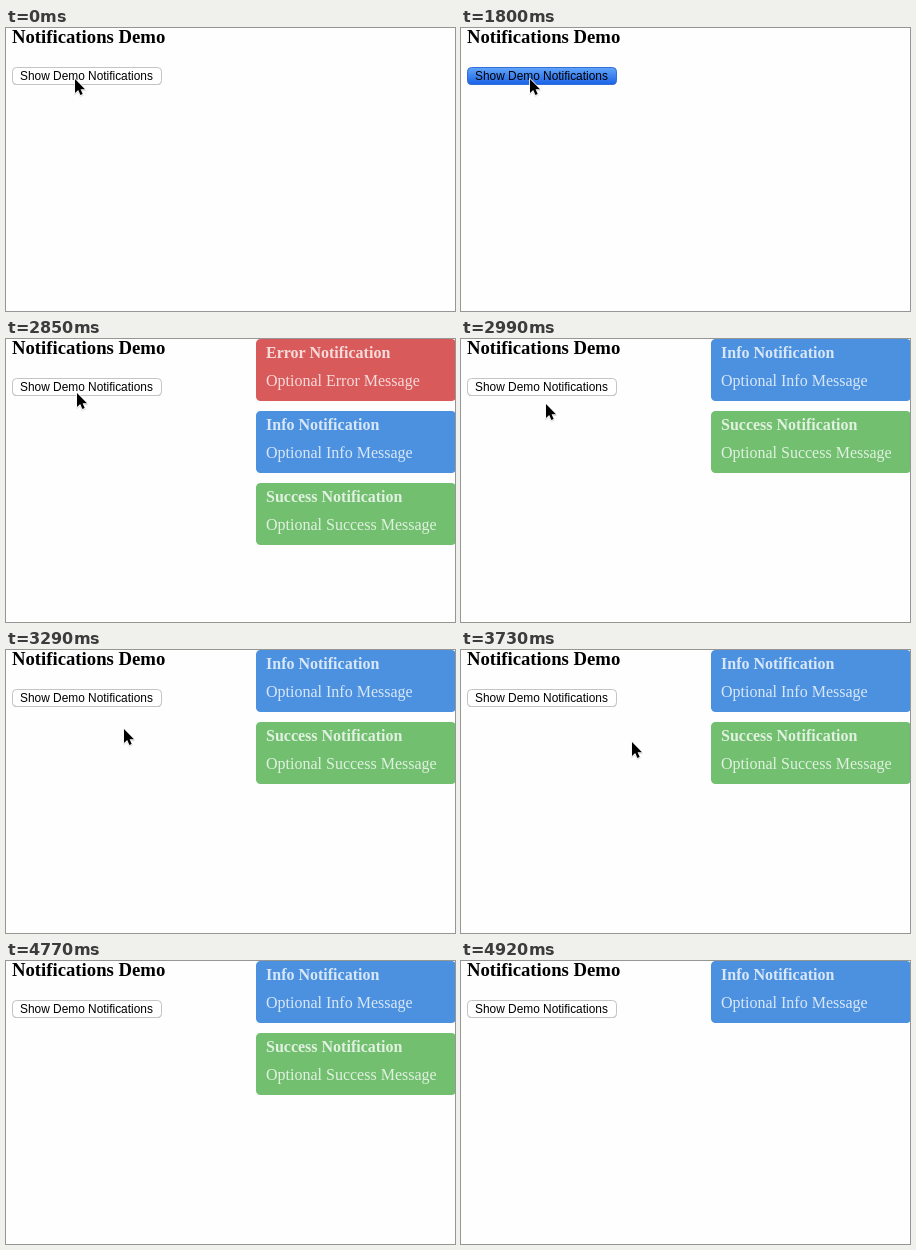
An HTML page that plays this animation: 449x283 px, repeating every 6.09 s.

```html
<!DOCTYPE html>
<html lang="en">
<head>
<meta charset="utf-8">
<title>Notifications Demo</title>
<style>
  html, body { margin: 0; width: 100%; height: 100%; overflow: hidden; background: #fefefe; }
  svg { display: block; width: 449px; height: 283px; }
  text { font: 16px "Liberation Serif", serif; font-variant-ligatures: none; }
  .bold { font-weight: bold; }
  .heading { font-size: 18.72px; }
  .label { font: 11.9px "Liberation Sans", sans-serif; }
  .note text { fill: #fff; fill-opacity: .78; }
</style>
</head>
<body>
<svg viewBox="0 0 449 283">
  <defs>
    <linearGradient id="pressed" x2="0" y2="1">
      <stop stop-color="#62a5fa"/>
      <stop offset="1" stop-color="#1a62e6"/>
    </linearGradient>
  </defs>
  <text class="bold heading" x="6" y="15">Notifications Demo</text>
  <rect x="6.5" y="40" width="149" height="17" rx="4" fill="#aaa"/>
  <rect id="button" x="6.5" y="39.5" width="149" height="17" rx="4"/>
  <text class="label" x="14" y="52">Show Demo Notifications</text>
  <g id="notes"></g>
  <g id="arrow" stroke-linejoin="round">
    <path d="M2 1V15L5.2 12L7.4 17L9.7 16L7.6 11.2H12Z" fill="#000" fill-opacity=".15"
      stroke="#000" stroke-opacity=".12" stroke-width="2" transform="translate(0 .8)"/>
    <path d="M2 1V15L5.2 12L7.4 17L9.7 16L7.6 11.2H12Z" stroke="#fff" stroke-width="1.6" paint-order="stroke"/>
  </g>
  <path id="beam" d="M1.5 1.5Q4.5 1.5 4.5 4Q4.5 1.5 7.5 1.5M4.5 4V14M1.5 16.5Q4.5 16.5 4.5 14Q4.5 16.5 7.5 16.5M3 11.5H6"
    fill="none" stroke="#222"/>
</svg>
<script>
const LOOP = 6090, PRESS = 1800, SHOW = 1950;
const $ = id => document.getElementById(id);

// Each notification has a colour and the time at which it closes.
const notes = [
  ["Error", "#d95a5a", 2990],
  ["Info", "#4c91df", LOOP],
  ["Success", "#72bf70", 4920],
].map(([kind, color, end]) => {
  $("notes").insertAdjacentHTML("beforeend", `<g class="note">
    <rect x="250" width="200" height="62" rx="4.5" fill="${color}"/>
    <text class="bold" x="260" y="19">${kind} Notification</text>
    <text x="260" y="47">Optional ${kind} Message</text></g>`);
  return { node: $("notes").lastElementChild, end };
});

// Pointer samples: time, left, top, shape.
const pointer = [
  [0, 67, 50, "arrow"], [2850, 69, 53, "arrow"], [2990, 83, 64, "arrow"],
  [3140, 107, 75, "arrow"], [3290, 116, 78, "arrow"], [3730, 169, 91, "arrow"],
  [3880, 257, 106, "beam"], [4030, 315, 141, "arrow"], [4180, 356, 189, "arrow"],
  [4330, 378, 213, "arrow"], [4480, 391, 228, "arrow"], [4620, 404, 260, "arrow"],
  [4770, 0, 0, "none"],
];

function show(node, visible) {
  node.style.display = visible ? "" : "none";
}

function draw(t) {
  const pressed = t >= PRESS && t < SHOW;
  $("button").setAttribute("fill", pressed ? "url(#pressed)" : "#fff");
  $("button").setAttribute("stroke", pressed ? "#3270d8" : "#c4c4c4");

  let y = 0;
  for (const { node, end } of notes) {
    const open = t >= SHOW && t < end;
    show(node, open);
    if (!open) continue;
    node.setAttribute("transform", `translate(0 ${y})`);
    y += 72;
  }

  const [, left, top, shape] = pointer.filter(p => p[0] <= t).pop();
  for (const id of ["arrow", "beam"]) {
    show($(id), id === shape);
    $(id).setAttribute("transform", `translate(${left} ${top})`);
  }
}

const start = performance.now();
function tick() {
  draw((performance.now() - start) % LOOP);
  requestAnimationFrame(tick);
}
tick();
</script>
</body>
</html>
```
